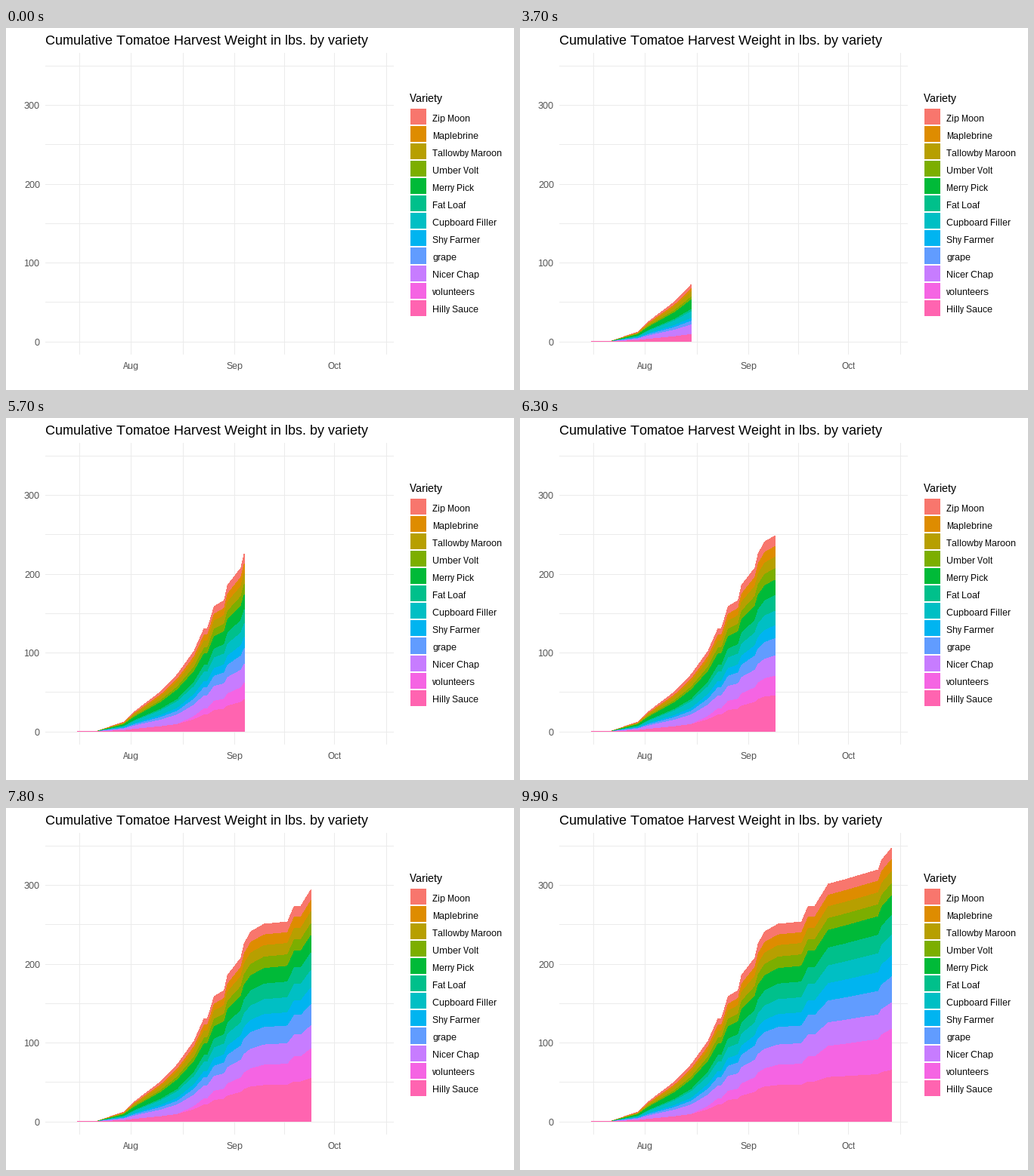
A matplotlib script that plays this animation: 672 by 480 pixels, repeating every 10000 ms.

```python
import numpy as np
import matplotlib
import matplotlib.pyplot as plt
from matplotlib.animation import FuncAnimation
from matplotlib.patches import Polygon, Rectangle

matplotlib.rcParams.update({
    "font.family": "Liberation Sans",
    "text.hinting": "native",
    "text.hinting_factor": 1,
    "text.kerning_factor": 6,
})

W, H, DPI = 672, 480, 96
FRAMES, INTERVAL = 100, 100
FIRST_VISIBLE = 10
FIRST_DAY, LAST_DAY = 5, 95
X0, DAY_PX = 72.4, 4.415
BASE, HALF_STEP = 415.6, 52.25
FLOOR = 416
KEY_STEP, KEY_SIZE = 23.04, 21.04
GRID, TICK = "#EBEBEB", "#4D4D4D"

# Name, colour, relative size early, midway and at the end of the harvest
VARIETIES = [
    ("Zip Moon", "#F8766D", (6, 14, 15)),
    ("Maplebrine", "#DE8C00", (4, 14, 16)),
    ("Tallowby Maroon", "#B79F00", (7, 15, 16)),
    ("Umber Volt", "#7CAE00", (4, 15, 16)),
    ("Merry Pick", "#00BA38", (13, 20, 26)),
    ("Fat Loaf", "#00C08B", (3, 20, 26)),
    ("Cupboard Filler", "#00BFC4", (9, 19, 27)),
    ("Shy Farmer", "#00B4F0", (4, 16, 28)),
    ("grape", "#619CFF", (5, 22, 34)),
    ("Nicer Chap", "#C77CFF", (13, 26, 35)),
    ("volunteers", "#F564E3", (0, 24, 54)),
    ("Hilly Sauce", "#FF64B0", (10, 46, 68)),
]

# Bends of the total curve: (day, height in pixels)
BENDS = [
    (5, .8), (11, .8), (19, 13), (22, 26), (30, 53), (35, 76), (40, 107),
    (43, 137), (44, 137), (46, 166), (49, 174), (50, 194), (54, 217),
    (55, 236), (57, 252), (61, 262), (68, 265), (70, 286), (72, 286),
    (76, 315), (81, 321), (91, 334), (92, 347), (95, 363),
]


def day_x(day):
    return X0 + DAY_PX * day


days = np.arange(FIRST_DAY, LAST_DAY + 1)
day_frames = np.round(days * (FRAMES - 1) / LAST_DAY + 0.04)


def layer_tops():
    """Top edge of each layer per day; its mix follows the total so far."""
    total = np.interp(days, *zip(*BENDS))
    sizes = np.array([np.interp(total, (0, 76, 252, 363), (0, *size))
                      for _, _, size in VARIETIES])
    sizes *= total / sizes.sum(axis=0)
    return FLOOR - np.cumsum(sizes[::-1], axis=0)[::-1]


tops = layer_tops()

fig = plt.figure(figsize=(W / DPI, H / DPI), dpi=DPI, facecolor="white")
ax = fig.add_axes([0, 0, 1, 1])
ax.set_xlim(0, W)
ax.set_ylim(H, 0)
ax.axis("off")


def box(x, y, w, h, color):
    ax.add_patch(Rectangle((x, y), w, h, facecolor=color, linewidth=0,
                           antialiased=False, zorder=1))


def label(x, y, text, px, color="black", ha="left"):
    ax.text(x, y, text, fontsize=px * 72 / DPI, color=color, ha=ha,
            va="baseline")


label(52, 22, "Cumulative Tomatoe Harvest Weight in lbs. by variety", 18)

for i in range(8):
    y = round(BASE - HALF_STEP * i)
    box(52, y, 461, 1, GRID)
    if i % 2 == 0:
        label(45, y + 5, str(50 * i), 12, TICK, "right")

month_starts = np.array([-10, 21, 52, 82, 113])
month_middles = (month_starts[:-1] + month_starts[1:]) / 2
for day in (*month_starts[1:-1], *month_middles):
    box(round(day_x(day)), 33, 1, 400, GRID)
for month, day in zip(("Aug", "Sep", "Oct"), month_starts[1:]):
    label(day_x(day), 452, month, 12, TICK, "center")

label(534, 98, "Variety", 15)
for i, (name, color, _) in enumerate(VARIETIES):
    key_top = 107.15 + KEY_STEP * i
    y0, y1 = round(key_top), round(key_top + KEY_SIZE)
    box(535, y0, 21, y1 - y0, color)
    label(564, 124 + KEY_STEP * i, name, 12)

# Each layer reaches down to the floor and is covered by the next one
layers = [
    ax.add_patch(Polygon(np.zeros((3, 2)), facecolor=color, linewidth=0,
                         antialiased=False, zorder=2, visible=False))
    for _, color, _ in VARIETIES
]


def update(frame):
    now = np.interp(frame, day_frames, days)
    span = np.append(days[days < now], now)
    xs = day_x(span)
    for layer, top in zip(layers, tops):
        outline = np.column_stack([xs, np.interp(span, days, top)])
        layer.set_visible(frame >= FIRST_VISIBLE)
        layer.set_xy([*outline, (xs[-1], FLOOR), (xs[0], FLOOR)])
    return layers


anim = FuncAnimation(fig, update, frames=FRAMES, interval=INTERVAL,
                     init_func=lambda: update(0), repeat=True,
                     repeat_delay=0, blit=False)
plt.show()
```
